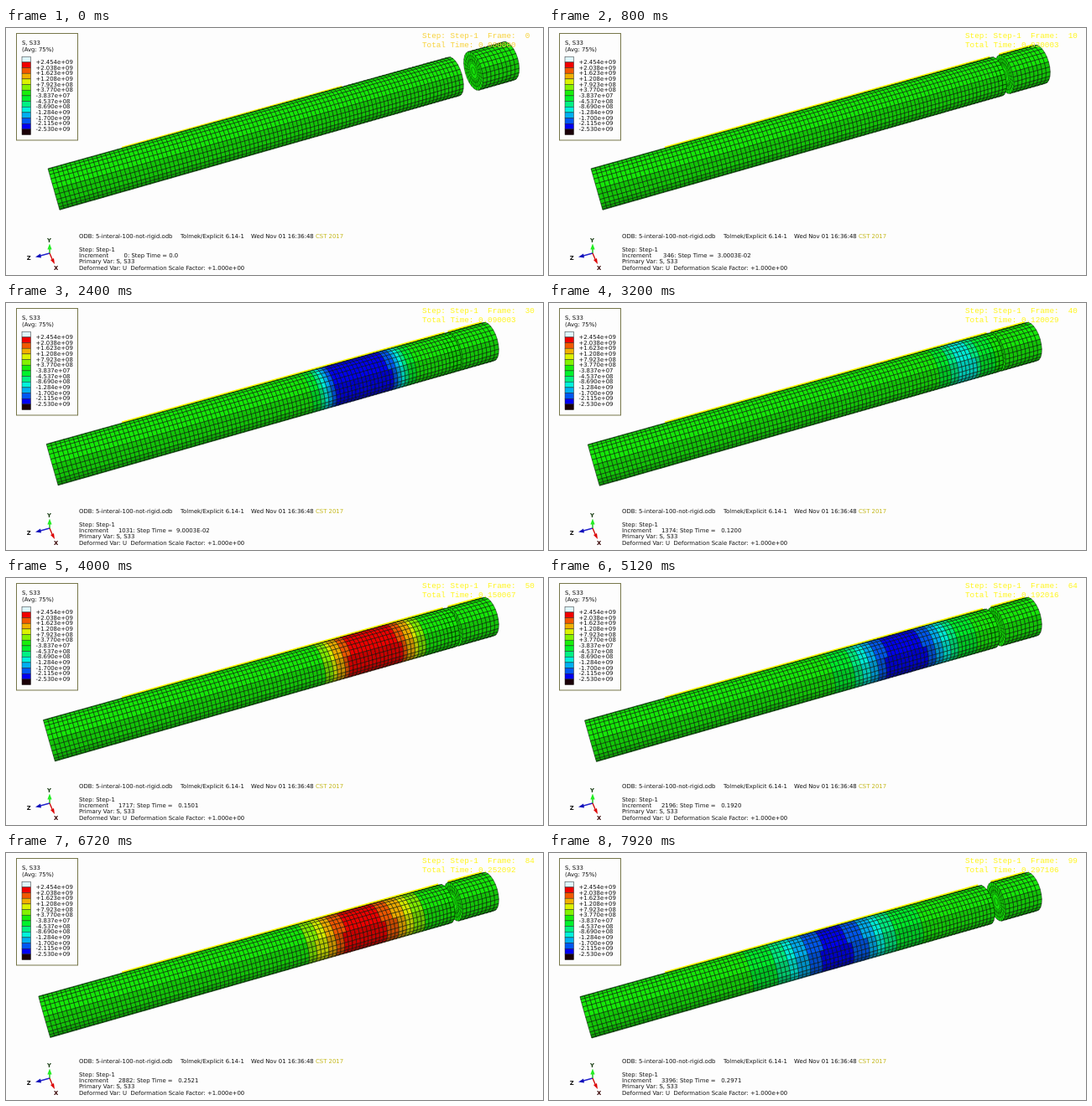
Recreate the animation shown at these times as an HTML page with a canvas. Size 640 by 295 pixels, loop 8 s.

```html
<!DOCTYPE html>
<html lang="en">
<head>
<meta charset="utf-8">
<title>Stress wave in an impacted bar</title>
<style>
  html, body { margin: 0; width: 100%; height: 100%; overflow: hidden; background: #fdfdfd; }
  canvas, svg { position: absolute; left: 0; top: 0; width: 640px; height: 295px; display: block; }
  text { font: 6.9px "DejaVu Sans", sans-serif; fill: #111; white-space: pre; }
  .head text { font: 9.3px "Liberation Mono", monospace; fill: inherit; }
  .axis text { font-weight: bold; font-size: 6.8px; }
</style>
</head>
<body>
<canvas id="stage" width="640" height="295"></canvas>
<svg viewBox="0 0 640 295">
  <rect x="12.5" y="6.5" width="73" height="127.5" fill="none" stroke="#77774a"/>
  <text x="19" y="19.5">S, S33</text>
  <text x="19" y="28">(Avg: 75%)</text>
  <g id="legend"></g>

  <g class="head" id="head">
    <text id="frame" x="496" y="12"></text>
    <text id="total" x="496" y="22.5"></text>
  </g>

  <text x="87" y="250.5">ODB: 5-interal-100-not-rigid.odb</text>
  <text x="208" y="250.5">Tolmek/Explicit 6.14-1</text>
  <text x="292" y="250.5">Wed Nov 01 16:36:48 <tspan fill="#d8cc20" style="fill:#c4b81c">CST 2017</tspan></text>
  <text x="87" y="267">Step: Step-1</text>
  <text x="87" y="274">Increment</text>
  <text id="inc" y="274"></text>
  <text x="87" y="281">Primary Var: S, S33</text>
  <text x="87" y="288.5">Deformed Var: U&#160; Deformation Scale Factor: +1.000e+00</text>

  <g class="axis" stroke-width="1.3">
    <path d="M52 269V262" stroke="#0b0"/>
    <path d="M52 257.5l2.6 7h-5.2z" fill="#2e2"/>
    <path d="M52 269L41 272" stroke="#22c"/>
    <path d="M35 273.5l6-4 1 5z" fill="#11b"/>
    <path d="M52 269L55 276" stroke="#c00"/>
    <path d="M58 282l-5-5 4-2z" fill="#d00"/>
    <text x="49" y="255.5" style="fill:#153a10">Y</text>
    <text x="24.8" y="276.5">Z</text>
    <text x="57" y="289" style="fill:#300">X</text>
  </g>
</svg>
<script>
const $ = id => document.getElementById(id);
const ctx = $('stage').getContext('2d');
const LEN = 477, ROWS = 12, COLS = 100, FRAMES = 100, STEP = 80;
const CELL = 4.7, BULGE = .02;
const TOP = 2.454, BAND = 4.984 / 12;
const BANDS = [
  [255, 0, 0], [255, 93, 0], [255, 185, 0], [232, 255, 0], [139, 255, 0], [24, 252, 10],
  [0, 255, 46], [0, 255, 139], [0, 255, 232], [0, 185, 255], [0, 93, 255], [0, 0, 255]
];
const rgb = (c, k) => `rgb(${c.map(v => Math.round(v * k))})`;
const clamp = (v, lo, hi) => Math.min(hi, Math.max(lo, v));
const wrap = v => v - 2 * LEN * Math.round(v / (2 * LEN));

function buildLegend() {
  const labels = ['+2.454e+09', '+2.038e+09', '+1.623e+09', '+1.208e+09', '+7.923e+08', '+3.770e+08',
    '-3.837e+07', '-4.537e+08', '-8.690e+08', '-1.284e+09', '-1.700e+09', '-2.115e+09', '-2.530e+09'];
  const fills = ['#dff8ff', ...BANDS.map(c => rgb(c, .95)), '#1a0008'];
  const h = 6.67;
  $('legend').innerHTML =
    fills.map((f, i) => `<rect x="19" y="${34.2 + i * h}" width="10.5" height="${h}" fill="${f}" stroke="#222" stroke-width=".5"/>`).join('') +
    labels.map((s, i) => `<text x="35.5" y="${43 + i * h}">${s}</text>`).join('');
}

// Distance run by the pulse since it entered the bar
const travel = n => 237 + 84 * (n - 20);

function stress(s, n) {
  const d = travel(n), age = Math.max(0, n - 17);
  const p = 2.5 + 6 * Math.exp(-age / 18), w = 48 + age * .14, peak = 2.5 - age * .003;
  const pulse = q => peak * Math.exp(-Math.pow(Math.abs(q) / w, p));
  const at = LEN - d;
  if (d < 200) return -pulse(s - at);
  return pulse(wrap(s + at)) - pulse(wrap(s - at));
}

// Each passage of the pulse pushes the material a little to the left
function shift(s, n) {
  const d = travel(n);
  let u = 0;
  for (let k = 0; k < 8; k++) {
    for (const pass of [LEN - s, LEN + s]) {
      u -= .93 * clamp((d - pass - 2 * LEN * k) / 100 + .5, 0, 1);
    }
  }
  return u;
}

// Perspective: nearer (left) elements are longer
const along = s => s * (1.1 - .1 * s / LEN);

function point(a, th) {
  const h = 1 - a * .00014, b = a * BULGE, c = Math.cos(th) * h, q = Math.sin(th) * b;
  return [57 + a - 7 * c + .96 * q, 192.6 - .2825 * a - 24.7 * c - .27 * q];
}

function trace(pts) {
  ctx.beginPath();
  pts.forEach(p => ctx.lineTo(p[0], p[1]));
}

const light = r => r < 6 ? .92 : r < 9 ? .78 : .68;

function tube(rings, value) {
  ctx.lineWidth = .75;
  ctx.strokeStyle = 'rgba(0,12,0,.7)';
  for (let i = 0; i + 1 < rings.length; i++) {
    const v = value(i);
    for (let r = 0; r < ROWS; r++) {
      const t0 = Math.PI * r / ROWS, t1 = Math.PI * (r + 1) / ROWS;
      const s = v * (r < 6 ? .96 : 1);
      const band = clamp(Math.floor((TOP - s) / BAND), 0, 11);
      trace([point(rings[i], t0), point(rings[i + 1], t0), point(rings[i + 1], t1), point(rings[i], t1)]);
      ctx.closePath();
      ctx.fillStyle = rgb(BANDS[band], light(r));
      ctx.fill();
      ctx.stroke();
    }
  }
}

function face(a) {
  const mid = point(a, Math.PI / 2), b = a * BULGE;
  const c = [mid[0] - .96 * b, mid[1] + .27 * b];
  const N = 24;
  const ring = k => Array.from({ length: N }, (_, i) => {
    const p = point(a, i * 2 * Math.PI / N);
    return [c[0] + (p[0] - c[0]) * k, c[1] + (p[1] - c[1]) * k];
  });
  ctx.strokeStyle = 'rgba(0,12,0,.7)';
  ctx.lineWidth = .6;
  ctx.fillStyle = rgb(BANDS[5], .88);
  [1, .8, .6, .4, .2].forEach((k, i) => {
    trace(ring(k));
    ctx.closePath();
    if (!i) ctx.fill();
    ctx.stroke();
  });
  const inner = ring(.45);
  ring(1).forEach((p, i) => {
    trace([inner[i], p]);
    ctx.stroke();
  });
}

function glow(a0, a1, width) {
  const p = point(a0, 0), q = point(a1, 0);
  trace([[p[0], p[1] - .8], [q[0], q[1] - .8]]);
  ctx.strokeStyle = '#ffff00';
  ctx.lineWidth = width;
  ctx.stroke();
}

function drawBodies(n) {
  ctx.fillStyle = '#fdfdfd';
  ctx.fillRect(0, 0, 640, 295);

  const start = LEN - .9 + 24 * Math.max(0, 1 - n / 17);
  const striker = Array.from({ length: 10 }, (_, i) => start + i * CELL);
  if (n) glow(start, start + 40, 2.4);
  face(start);
  tube(striker, i => travel(n) < 60 ? stress(LEN + i * CELL, n) : 0);

  const ds = LEN / COLS;
  const bar = Array.from({ length: COLS + 1 }, (_, i) => along(i * ds) + shift(i * ds, n));
  glow(88, n ? bar[COLS] - 2 : 350, n ? 2.4 : 1.6);
  tube(bar, i => stress((i + .5) * ds, n));
}

function drawText(n) {
  const inc = Math.floor(n ? 3.7 + 34.27 * n : 0);
  const time = n ? Math.max(.003 * n + 3e-6, inc * 8.7575e-5 - .000299) : 0;
  let value = ' 0.0';
  if (n) {
    value = time < .1
      ? '  ' + time.toExponential(4).toUpperCase().replace(/E-(\d)$/, 'E-0$1')
      : '   ' + time.toFixed(4);
  }
  $('head').setAttribute('fill', n ? '#fff51e' : '#f7d23c');
  $('frame').textContent = 'Step: Step-1  Frame:  ' + n;
  $('total').textContent = 'Total Time: ' + time.toFixed(6);
  $('inc').setAttribute('x', 140.5 - 2.2 * (String(inc).length - 1));
  $('inc').textContent = inc + ': Step Time =' + value;
}

let last = -1;
function tick(now) {
  const n = Math.floor(now / STEP) % FRAMES;
  if (n !== last) {
    last = n;
    drawBodies(n);
    drawText(n);
  }
  requestAnimationFrame(t => tick(Math.max(0, t - t0)));
}

buildLegend();
const t0 = performance.now();
tick(0);
</script>
</body>
</html>
```
